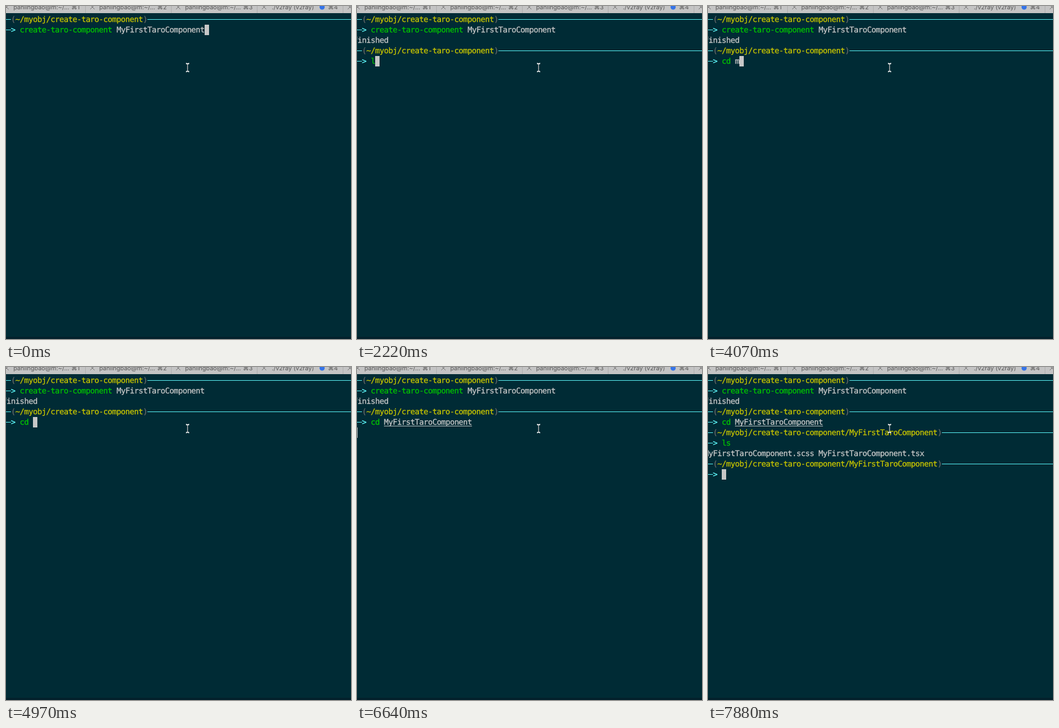
These frames come from a looping animation (627 by 606 pixels, 8 s). An HTML page:

```html
<!DOCTYPE html>
<html lang="en">
<head>
<meta charset="utf-8">
<title>Terminal</title>
<style>
  html, body { margin: 0; width: 100%; height: 100%; overflow: hidden; background: #002b35; }
  svg { display: block; width: 627px; height: 606px; }
  text { white-space: pre; text-rendering: geometricPrecision; }
  .cell { font: 14.2px "DejaVu Sans Mono", monospace; letter-spacing: calc(8px - .60205em); stroke-width: .3px; }
  .tab { font: 11px Inter, "DejaVu Sans", sans-serif; fill: #585858; }
</style>
</head>
<body>
<svg id="stage" viewBox="0 0 627 606" xmlns="http://www.w3.org/2000/svg">
  <rect width="627" height="606" fill="#002b35"/>
  <rect y="602" width="627" height="4" fill="#03202b"/>
  <g id="screen"></g>
  <rect id="cursor" width="8" height="19" fill="#c7c7c7"/>
  <g id="tabs"><rect width="627" height="13" fill="#c4c4c4"/></g>
  <g fill="none">
    <path d="M327 104.500q3 0 3 2.500v10q0 2.500-3 2.500M333 104.500q-3 0-3 2.500m0 10q0 2.500 3 2.500" stroke="#e4e8e8" stroke-width="1.900"/>
    <path d="M330 106v12" stroke="#0b1a1f" stroke-width=".8"/>
  </g>
</svg>
<script>
const LOOP = 8000, CELL = 8, LINE = 19, LEFT = -7, TOP = 15;
const GREEN = '#00c200', GREY = '#c7c7c7', YELLOW = '#c7c400', CYAN = '#60fdff', DIM = '#686868';
const screen = document.getElementById('screen');
const tabs = document.getElementById('tabs');
const cursor = document.getElementById('cursor');
const items = [];

function add(parent, tag, attrs, content = '') {
  const el = document.createElementNS('http://www.w3.org/2000/svg', tag);
  for (const key in attrs) el.setAttribute(key, attrs[key]);
  el.textContent = content;
  parent.appendChild(el);
  return el;
}

const colX = col => LEFT + col * CELL;
const rowY = row => TOP + row * LINE;

// Each item is visible while from <= time < to.
function show(el, from, to = LOOP) {
  items.push({ el, from, to });
}

function write(row, col, text, fill, from, to, opts = {}) {
  const x = colX(col), y = rowY(row);
  const weight = opts.bold ? 'bold' : 'normal';
  show(add(screen, 'text', { class: 'cell', x, y: y + 14, fill, stroke: fill, 'font-weight': weight }, text), from, to);
  if (opts.under) {
    show(add(screen, 'rect', { x, y: y + 16, width: text.length * CELL, height: 1, fill }), from, to);
  }
}

function rule(row, x, width, from) {
  show(add(screen, 'rect', { x, y: rowY(row) + 9, width, height: 1, fill: CYAN }), from);
}

function prompt(row, path, from) {
  const end = 3 + path.length;
  rule(row, 0, 9, from);
  write(row, 2, '(', DIM, from);
  write(row, 3, path, YELLOW, from);
  write(row, end, ')', DIM, from);
  rule(row, colX(end + 1), 627 - colX(end + 1), from);
  rule(row + 1, 0, 9, from);
  write(row + 1, 2, '>', CYAN, from, LOOP, { bold: true });
}

const tool = 'create-taro-component', name = 'MyFirstTaroComponent';
const home = '~/myobj/' + tool, inner = home + '/' + name;

prompt(0, home, 0);
write(1, 4, tool, GREEN, 0);
write(1, 26, name, GREY, 0);
write(2, 0, 'finished', GREY, 780);

prompt(3, home, 900);
write(4, 4, 'l', GREEN, 2220, 3110);
write(4, 5, 's', GREEN, 2340, 3000);
write(4, 4, 'c', GREY, 3350, 3410, { under: true });
write(4, 4, 'cd', GREEN, 3410);
write(4, 7, 'm', GREY, 4070, 4970);
write(4, 7, 'M', GREY, 5330, 5800, { under: true });
write(4, 8, 'y', GREY, 5630, 5800, { under: true });
write(4, 7, name, GREY, 5800, 6640);
write(4, 27, '/', '#ffffff', 5800, 6640, { bold: true });
write(4, 7, name, GREY, 6640, LOOP, { under: true });

prompt(5, inner, 6760);
write(6, 4, 'l', GREEN, 7420);
write(6, 5, 's', GREEN, 7530);
write(7, 0, name + '.scss ' + name + '.tsx', GREY, 7650);
prompt(8, inner, 7880);

// time, row, column
const moves = [
  [0, 1, 46], [630, 2, 0], [780, 3, 0], [900, 4, 4],
  [2220, 4, 5], [2340, 4, 6], [3000, 4, 5], [3110, 4, 4],
  [3350, 4, 5], [3410, 4, 6], [3530, 4, 7], [4070, 4, 8],
  [4970, 4, 7], [5330, 4, 8], [5630, 4, 9], [5800, 4, 28],
  [6640, 5, 0], [6760, 6, 4], [7420, 6, 5], [7530, 6, 6],
  [7650, 8, 0], [7880, 9, 4]
];

function drawTabs() {
  for (let i = 0; i < 5; i++) {
    const x = i * 156;
    add(tabs, 'path', { d: `M${x - 3} -2l8 8m0-8l-8 8`, stroke: '#707070', fill: 'none' });
    add(tabs, 'rect', { x: x - 12, y: 0, width: 1, height: 13, fill: '#adadad' });
    if (i === 4) break;
    const last = i === 3;
    const label = last ? './v2ray (v2ray)' : 'panlingbao@m:~/...';
    add(tabs, 'text', { class: 'tab', x: x + (last ? 15 : 13.5), y: 6 }, label);
    add(tabs, 'text', { class: 'tab', x: x + (last ? 117 : 118.5), y: 6 }, '⌘' + (i + 1));
  }
  add(tabs, 'circle', { cx: 574.5, cy: 2, r: 4.7, fill: '#3574e8' });
}

function render(t) {
  for (const { el, from, to } of items) {
    el.style.display = t >= from && t < to ? '' : 'none';
  }
  const [, row, col] = moves.filter(m => m[0] <= t).pop();
  cursor.setAttribute('x', colX(col));
  cursor.setAttribute('y', rowY(row));
}

drawTabs();
render(0);
const start = performance.now();
function tick() {
  render((performance.now() - start) % LOOP);
  requestAnimationFrame(tick);
}
requestAnimationFrame(tick);
</script>
</body>
</html>
```
